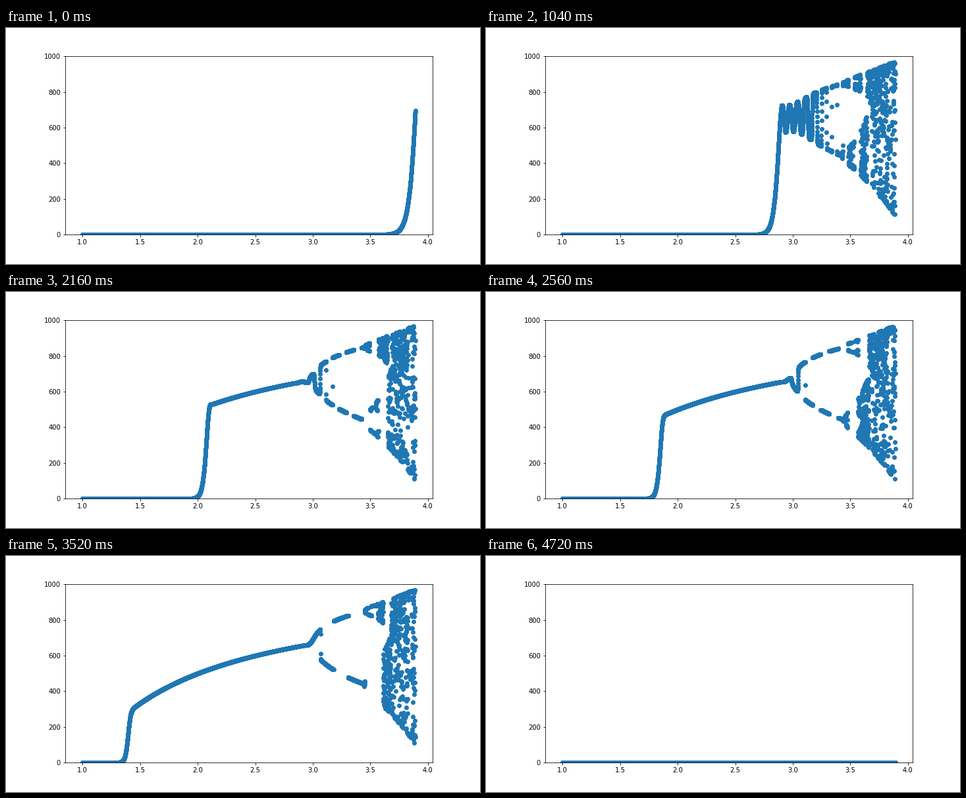
Write a matplotlib script that moves like this. It is 720 by 360 pixels and loops after 4.8 s.

```python
import numpy as np
import matplotlib.pyplot as plt
from matplotlib.animation import FuncAnimation

FRAMES = 60
INTERVAL = 80
GENERATIONS = 100
CAPACITY = 1000.0
RATES = np.linspace(1, 3.89, 5000)


def population(start):
    """Logistic growth for every rate, after all generations."""
    x = np.full_like(RATES, start)
    for _ in range(GENERATIONS):
        x = RATES * x * (1 - x / CAPACITY)
    return x


def start_size(frame):
    """Ten times larger in each frame, up to the full capacity."""
    return CAPACITY * 10.0 ** (frame - FRAMES + 1)


fig, ax = plt.subplots(figsize=(10, 5), dpi=72, facecolor="white")
fig.subplots_adjust(left=0.125, right=0.9, bottom=0.125, top=0.88)

dots = ax.scatter(RATES, population(start_size(0)), s=36, color="#1f77b4",
                  linewidths=1.0)

# x range: marker radius on a unit axis, then a 5% margin
pad = 3 / 558
low, high = RATES[0] - pad, RATES[-1] + pad
margin = 0.05 * (high - low)
ax.set_xlim(low - margin, high + margin)
ax.set_ylim(0, CAPACITY)


def update(frame):
    dots.set_offsets(np.column_stack([RATES, population(start_size(frame))]))
    return (dots,)


anim = FuncAnimation(fig, update, frames=FRAMES, interval=INTERVAL,
                     repeat=True, repeat_delay=0)
plt.show()
```
